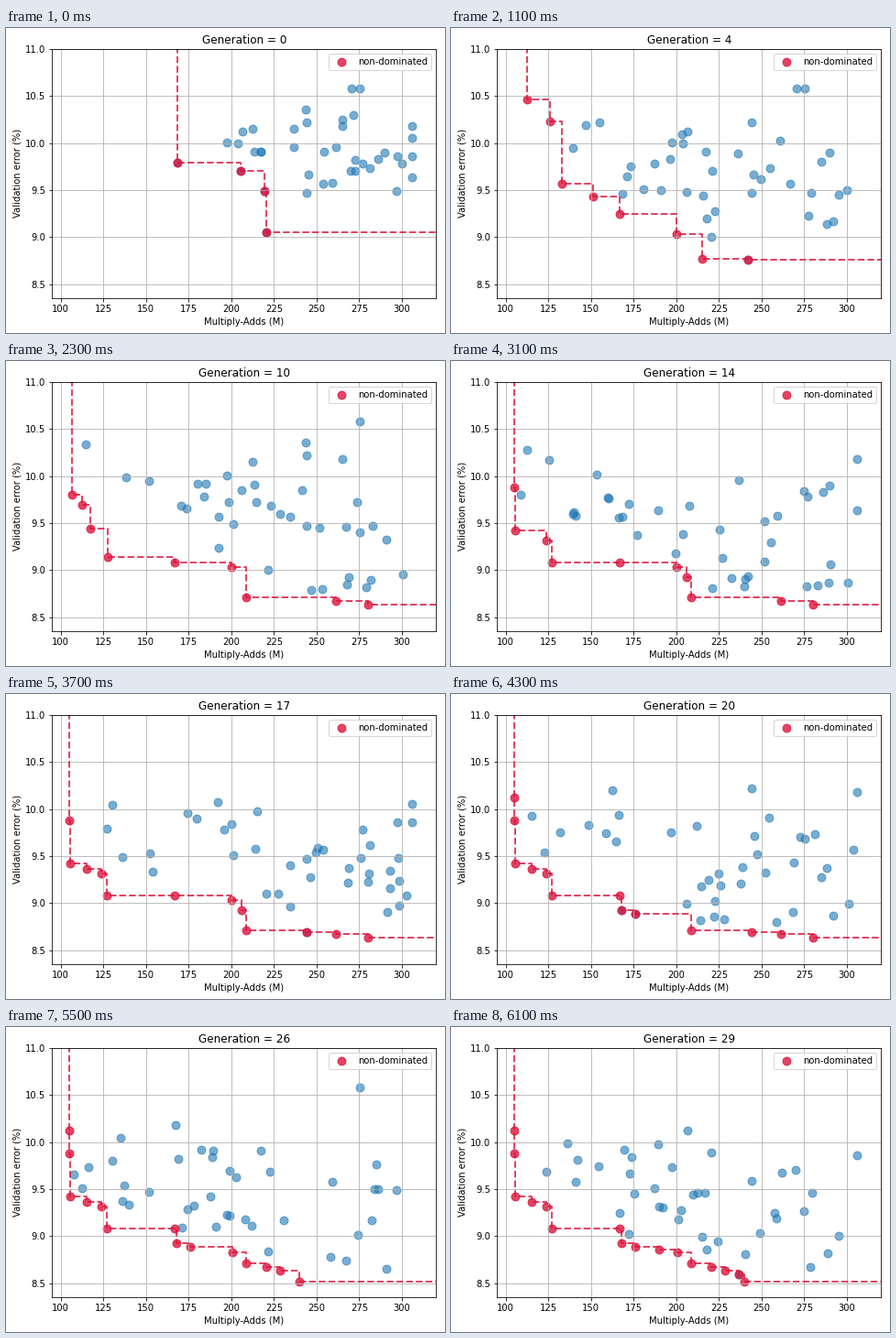
A matplotlib script that plays this animation: 479x333 px, repeating every 6600 ms.

```python
import matplotlib.pyplot as plt
import numpy as np
from matplotlib.animation import FuncAnimation

W, H, DPI = 479, 333, 72
POP, LAST = 40, 29
XLIM, YLIM = (95, 320), (8.35, 11)

# Breakthroughs by generation: (multiply-adds, error)
KEYS = {
    0: [(168.6, 9.792), (205.6, 9.704), (219.6, 9.49), (220.7, 9.051)],
    1: [(133.1, 9.568), (167, 9.246)],
    2: [(112.7, 10.464), (200.3, 9.032)],
    3: [(215.3, 8.769)],
    4: [(242.2, 8.759)],
    5: [(127.8, 9.139)],
    7: [(106.8, 9.802), (117.6, 9.441), (208.9, 8.71)],
    9: [(280.3, 8.632)],
    12: [(105.2, 9.88), (105.7, 9.422), (127.2, 9.081)],
    19: [(105.1, 10.123)],
    20: [(168, 8.925), (176.1, 8.888)],
    22: [(240, 8.516)],
}


def pareto(points):
    """Non-dominated points, left to right."""
    front = []
    for x, y in sorted(points):
        if not front or y < front[-1][1]:
            front.append((x, y))
    return np.array(front)


def refine(front, rng):
    """A new point inside the largest step of the front."""
    step = np.diff(front, axis=0)
    k = np.argmax(-step[:, 0] * step[:, 1])
    x, y = front[k] + step[k] * rng.uniform((0.5, 0.25), (0.75, 0.6))
    return x, y


def above(front, x, gap):
    """Heights at a given gap over the front."""
    return front[np.searchsorted(front[:, 0], x) - 1, 1] + gap


def first_generation(front, rng):
    n = POP - len(front)
    x = np.clip(rng.normal(265, 32, n), 182, 306)
    y = np.maximum(rng.normal(9.9, 0.33, n), above(front, x, 0.2))
    return np.column_stack([x, y])


def offspring(front, n, rng):
    left = front[front[:, 1] < 9.9][0, 0] + 2
    x = left + (304 - left) * rng.beta(1.4, 1.2, n)
    y = above(front, x, 0.08 + 1.25 * rng.beta(1.3, 1.9, n))
    return np.column_stack([x, y])


def evolve():
    rng, pick = np.random.default_rng(4), np.random.default_rng(11)
    found, fronts, pops = [], [], []
    for gen in range(LAST + 1):
        born = list(KEYS.get(gen, []))
        if gen % 2:
            born.append(refine(pareto(found + born), pick))
        found += born
        front = pareto(found)
        if gen == 0:
            first = pop = first_generation(front, rng)
        else:
            kept = rng.permutation(first)[:round(11 - 0.28 * gen)]
            n = POP - len(kept) - len(born)
            pop = np.vstack([kept, offspring(front, n, rng)])
        fronts.append(front)
        pops.append(np.vstack([pop, np.reshape(born, (-1, 2))]))
    return fronts, pops


FRONTS, POPS = evolve()

# The small margin guards against rounding down to one pixel less
fig = plt.figure(figsize=((W + 0.01) / DPI, (H + 0.01) / DPI), dpi=DPI)
ax = fig.add_axes([50.25 / W, (H - 294.9) / H, 419 / W, 272 / H])
ax.set(xlim=XLIM, ylim=YLIM, xlabel="Multiply-Adds (M)",
       ylabel="Validation error (%)")
ax.set_xticks(range(100, 301, 25))
ax.set_yticks(np.arange(8.5, 11.1, 0.5))
ax.grid(True)

title = ax.set_title("Generation = 0")
dots = ax.scatter([], [], s=80, color="tab:blue", alpha=0.6)
best = ax.scatter([], [], s=80, color="crimson", alpha=0.8, label="non-dominated")
line, = ax.plot([], [], "--", color="crimson", lw=2, alpha=0.8,
                drawstyle="steps-post")
ax.legend(loc="upper right")


def draw(i):
    # First and last generations hold 500 ms, the others 200 ms
    gen = min(max((i - 5) // 2 + 1, 0), LAST)
    front = FRONTS[gen]
    x, y = front.T
    dots.set_offsets(POPS[gen])
    best.set_offsets(front)
    # Ends far outside the axes on both sides
    line.set_data([x[0], *x, 2 * XLIM[1]], [2 * YLIM[1], *y, y[-1]])
    title.set_text(f"Generation = {gen}")
    return dots, best, line, title


anim = FuncAnimation(fig, draw, frames=66, interval=100, repeat=True,
                     repeat_delay=0, blit=False)
plt.show()
```
